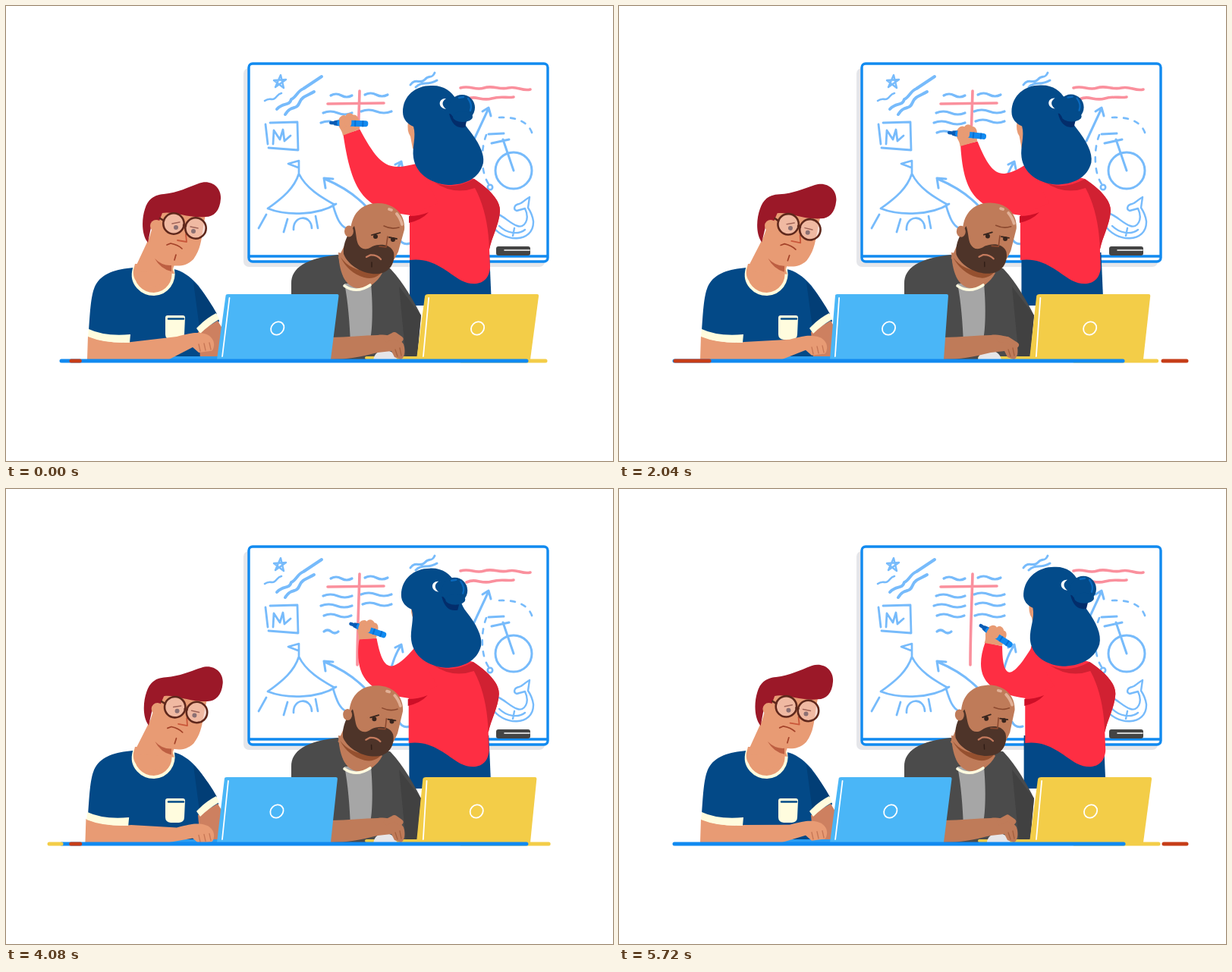
Write an HTML page that moves like this. It is 800 px wide and 600 px high and loops after 5.76 s.

```html
<!DOCTYPE html>
<html lang="en">
<head>
<meta charset="utf-8">
<title>Whiteboard meeting</title>
<style>
html, body { margin: 0; width: 100%; height: 100%; overflow: hidden; background: #fff; }
svg { display: block; width: 100%; height: 100%; }
.line { fill: none; stroke-linecap: round; stroke-linejoin: round; }
.ink { stroke: #77bbfb; stroke-width: 3.2; }
.pink { stroke: #fa909d; stroke-width: 3.6; }
.skin { fill: #e89b74; }
.tan { fill: #bf7b59; }
.ring { stroke: #fff; stroke-width: 1.8; }
</style>
</head>
<body>
<svg viewBox="0 0 800 600">
  <!-- whiteboard -->
  <rect x="313" y="82" width="397" height="262" rx="7" fill="#e5e6ea"/>
  <rect x="320" y="76" width="394" height="261" rx="5" fill="#fff" stroke="#118af0" stroke-width="3.4"/>
  <path d="M320 330H714" stroke="#118af0" stroke-width="3.4"/>
  <rect x="646" y="317" width="45" height="12" rx="3" fill="#444"/>
  <path class="line" d="M657 322H690" stroke="#fff" stroke-width="1.6"/>

  <g class="line ink">
    <path d="M362 91L366 108L353 98L369 97L355 107Z" stroke-width="2.4"/>
    <path d="M341 125C348 120 350 125 354 122S358 116 363 115" stroke-width="2.6"/>
    <path d="M357 136C366 126 373 133 376 123C383 120 384 112 392 109L416 93" stroke-width="4"/>
    <path d="M368 143C377 129 382 139 387 127C390 119 398 118 406 113" stroke-width="4"/>
    <path d="M348 154L384 153L385 190L346 187M342 156L345 182M352 182L353 164L361 176L365 163L367 178L375 171" stroke-width="2.8"/>
    <path d="M345 267C365 253 380 240 386 221C395 240 415 252 433 262M345 267C370 277 412 276 435 261M343 275L333 293M431 263C436 280 440 289 448 293M371 281L366 298M408 277L411 293M379 295C378 276 402 274 403 293M386 220V204L372 208L385 213" stroke-width="2.7"/>
    <path d="M420 228C444 238 464 252 478 268M421 240L419 227L431 228M506 243Q511 221 520 207M513 209L521 205L523 215M518 307Q523 316 532 313" stroke-width="3"/>
    <path d="M533 104C540 94 546 104 552 97S561 97 565 88M540 107C549 98 555 106 568 98" stroke-width="3"/>
    <path d="M616 178L636 135M628 139L636 134L639 145" stroke-width="3"/>
    <path d="M650 147C675 146 690 154 694 170M633 170C625 190 626 222 637 236" stroke-width="2.6" stroke-dasharray="6 9"/>
    <circle cx="638" cy="239" r="3.2" stroke-width="2.6"/>
    <circle cx="669" cy="217" r="24" stroke-width="3"/>
    <path d="M669 217L655 176M640 181L663 176M636 169L656 168" stroke-width="3"/>
    <path d="M640 288C654 313 696 313 695 284C694 276 692 272 688 266L690 252C684 255 681 260 676 261C670 262 668 268 673 270L684 267C691 282 683 293 674 290C664 287 657 277 645 273M650 290C660 300 675 302 684 295M670 293L668 303" stroke-width="2.4"/>
    <g id="notes"></g>
  </g>
  <path class="line pink" d="M599 108C612 104 618 112 630 108S650 111 662 108S680 113 691 110M607 123C620 117 626 126 640 122S660 122 669 120"/>
  <path class="line pink" stroke-width="3" d="M424 129L498 128M466 112C465 150 463 190 463 232"/>

  <!-- presenter -->
  <path id="trousers" fill="#034887" d="M532 325H637L640 395H532Z"/>
  <g id="torso">
    <path fill="#fe2e43" d="M540 207C560 222 600 222 617 228C632 238 652 254 651 271C650 288 640 305 637 321L638 345C636 368 616 370 600 362C580 350 562 331 532 335V272Z"/>
    <path fill="#d12132" d="M564 232Q588 244 617 228C632 238 652 254 651 271C650 288 640 305 637 321C636 290 630 262 618 240Q590 250 564 232Z"/>
  </g>
  <path id="sleeve" fill="#fe2e43"/>
  <path id="armpit" fill="#cd0f27" d="M531 277Q545 277 557 272Q548 282 531 286Z"/>
  <path id="face" class="skin" d="M530 152Q528 165 533 172L536 188L543 190V152Z"/>
  <path id="hair" fill="#034b8a" d="M523 140C523 118 540 105 560 105C576 104 587 112 594 124C600 142 602 154 609 162C622 178 631 194 629 207C624 228 604 236 583 236C558 234 540 220 537 200C535 186 541 172 537 159C530 156 523 150 523 140Z"/>
  <g id="bun">
    <path fill="#032d6b" d="M584 142Q589 163 605 160L608 148Z"/>
    <circle cx="601" cy="134" r="17" fill="#034b8a"/>
    <ellipse cx="602" cy="146" rx="13" ry="7" fill="#034b8a"/>
    <path class="line" d="M609 122Q615 130 612 138M597 121L603 120" stroke="#0a69bd" stroke-width="2.4"/>
    <path fill="#fff" d="M580 122C570 121 568 134 580 136C574 131 574 126 580 122Z"/>
  </g>
  <path id="palm" class="skin" d="M-14 0C-15 -7 -8 -13 -4 -10C-2 -15 4 -14 6 -11C11 -12 14 -6 13 0L14 8L-8 16C-9 8 -14 6 -14 0Z"/>
  <g id="pen">
    <path class="line" d="M1 0H6" stroke="#0a5cb5" stroke-width="4.5"/>
    <path d="M5 -3L11 -4V4L5 3Z" fill="#0a5cb5"/>
    <rect x="9" y="-4" width="41" height="8" rx="3.5" fill="#118af0"/>
    <path d="M33 -4V4M43 -4V4" stroke="#0a6fd0" stroke-width="2"/>
    <rect x="12" y="-8" width="10" height="14" rx="4.5" class="skin"/>
    <rect x="19" y="-8" width="9" height="13" rx="4.5" class="skin"/>
  </g>

  <!-- colleague in the middle -->
  <path fill="#4b4b4b" d="M376 395V366C376 345 395 333 437 328L480 345L506 346C522 362 538 390 547 408L541 466H380Z"/>
  <path fill="#414141" d="M518 370L547 408L542 464H527Z"/>
  <path fill="#a6a6a6" d="M446 366H481C484 400 483 430 479 445H454C453 420 451 390 446 366Z"/>
  <path class="tan" d="M438 325L480 335L496 352C488 366 478 373 463 372C446 370 439 350 438 325Z"/>
  <path class="line" d="M446 369Q462 380 480 368" stroke="#fffbe0" stroke-width="3.6"/>
  <g id="bald">
    <path class="tan" d="M438 332L454 300C454 275 468 260 490 260C513 260 527 276 525 295L517 324C506 348 492 352 478 350L450 345Z"/>
    <path fill="#95502f" d="M441 331C452 348 476 354 498 347C492 357 483 361 472 358C458 354 447 344 441 331Z"/>
    <path fill="#4e3429" d="M459 290C448 303 444 316 445 327C453 347 480 357 496 352C508 348 513 336 511 325C507 314 493 313 483 317C474 323 468 321 464 314C461 307 462 300 459 290Z"/>
    <ellipse class="tan" cx="452" cy="297" rx="6" ry="7.5"/>
    <path class="line" d="M475 331L480 328.500Q489 328 494 334" stroke="#c57b5e" stroke-width="2.3"/>
    <path class="line" d="M482 338V344" stroke="#301d16" stroke-width="1.4"/>
    <path class="line" d="M503 304L501 318L492 317M498 290Q508 295 518 292" stroke="#8b492f" stroke-width="1.6"/>
    <g fill="#38251e"><circle cx="487" cy="304" r="3"/><circle cx="510" cy="308" r="3"/></g>
    <path class="line" d="M482 302L493 299M505 305L515 307" stroke="#38251e" stroke-width="1.8"/>
    <path class="line" d="M505 268L508 269M515 274Q520 280 522 288" stroke="#e1b096" stroke-width="3.8"/>
  </g>
  <path class="line" d="M475 464H546" stroke="#f3cd48" stroke-width="4"/>
  <path id="mouse" fill="#e6e6e9" d="M479 467C480 458 486 454 494 454S509 459 510 467Z"/>
  <path class="tan" d="M428 437C450 437 472 434 490 434C503 432 518 437 524 446C527 455 525 465 520 466L512 463L508 455L490 457C466 463 450 466 428 466Z"/>
  <path class="line" d="M513 453L516 462M519 451L521 461" stroke="#a3603f" stroke-width="1.3"/>
  <path id="finger" class="line" stroke="#bf7b59" stroke-width="8"/>

  <!-- colleague on the left -->
  <path id="shirt" fill="#034987" d="M168 345C145 347 127 352 118 368C112 380 111 400 109 430L163 446V466H262L281 415C272 396 262 378 251 366C243 357 232 349 221 347Z"/>
  <path fill="#023e76" d="M247 364Q265 382 278 406L255 424Z"/>
  <path fill="#cd8060" d="M253 430L279 415L285 425L280 464H256Z"/>
  <path fill="#fffcde" d="M277 405L281 413Q266 422 256 432L251 425Q263 412 277 405Z"/>
  <path fill="#fffcde" d="M210 411Q210 408 213 408H233Q236 408 236 411L235 433Q235 439 228 440H217Q210 439 210 433Z"/>
  <path class="line" d="M214 412.500H234" stroke="#034987" stroke-width="2.4"/>
  <path fill="#e89b74" stroke="#fffcde" stroke-width="4" d="M169 346C163 367 180 380 195 380C213 379 223 363 220 348Z"/>
  <path class="skin" d="M170 340L222 341L218 352C208 378 164 376 168 348Z"/>
  <g id="redhead">
    <path class="skin" d="M201 265L263 276C257 300 260 316 247 334C237 344 227 343 218 342L222 353L168 350L189 305Z"/>
    <path fill="#bd5f42" d="M196 333Q206 343 218 342L218 350Q204 347 196 333Z"/>
    <path fill="#9b1828" d="M187 312C178 301 179 280 183 268C187 254 196 249 208 248C227 246 240 239 254 234C270 228 284 239 283 254C282 270 274 278 263 278C240 280 220 270 206 273L201 286L192 287Z"/>
    <circle class="skin" cx="198" cy="290" r="8"/>
    <path class="line" d="M237 301L238 311L226 309" stroke="#c9573a" stroke-width="1.8"/>
    <path class="line" d="M212 315L217 313Q227 315 232 320M222 335L224 328" stroke="#a34229" stroke-width="1.7"/>
    <g fill="#f4cabb" fill-opacity=".65" stroke="#5f281c" stroke-width="2.6"><circle cx="221" cy="287" r="13.700"/><circle cx="250" cy="293" r="13.700"/></g>
    <path class="line" d="M234 289L237 290M208 283L203 280" stroke="#5f281c" stroke-width="2.6"/>
    <g id="eyes" fill="#8c7073"><circle cx="224" cy="292" r="3"/><circle cx="247" cy="297" r="3"/></g>
    <path class="line" d="M219 287L229 285M243 291L253 293" stroke="#a26559" stroke-width="1.5"/>
  </g>
  <path class="line" d="M210 464H282" stroke="#2b9df0" stroke-width="4"/>
  <path id="forearm" class="skin"/>
  <path id="knuckles" class="line" stroke="#c67655" stroke-width="1.3"/>
  <path id="cuff" fill="#fffcde" d="M109 426Q130 436 164 433L163 444Q130 445 108 436Z"/>

  <!-- laptops -->
  <g id="blueLaptop">
    <path fill="#4ab6f7" d="M291 380H435Q437 380 437 382L428 466H278L288 382Q288 380 291 380Z"/>
    <path class="line ring" d="M293 385L285 462"/>
    <ellipse class="line ring" rx="9.200" ry="8" transform="translate(357 425) rotate(-45)"/>
  </g>
  <g id="yellowLaptop">
    <path fill="#f3cd48" d="M557 380H701Q703 380 703 382L691 466H541L553 382Q554 380 557 380Z"/>
    <path class="line ring" d="M558 385L550 462"/>
    <ellipse class="line ring" rx="9.200" ry="8" transform="translate(622 425) rotate(-45)"/>
  </g>
  <g id="table" class="line" stroke-width="5"></g>
</svg>
<script>
const LOOP = 5760, STEP = 40;
const $ = id => document.getElementById(id);
const set = (id, name, value) => $(id).setAttribute(name, value);
const move = (id, value) => set(id, 'transform', value);
const clamp01 = x => Math.max(0, Math.min(1, x));
const mix = (a, b, p) => a + (b - a) * p;
const smooth = p => p * p * (3 - 2 * p);
const progress = (t, from, to) => clamp01((t - from) / (to - from));
const wave = (t, period, peak = 0) => Math.cos(2 * Math.PI * (t - peak) / period);
const bump = (t, peak, width) => Math.exp(-(((t - peak) / width) ** 2));
const polar = (length, degrees) => {
  const a = degrees * Math.PI / 180;
  return [length * Math.cos(a), length * Math.sin(a)];
};
const skewAt = (y, k) => `matrix(1 0 ${-k} 1 ${k * y} 0)`;

// Key poses for the two heads and the presenter, eased from beat to beat.
const BEATS = [0, 1520, 2520, 3480, 4080, 5040, 5720];
const LEAN = [0, -7.5, -6, 2.5, -3, -10, 3.5];
const TURN = [0, 0.5, 2, 5.5, 1, 3, 7.5];
const NOD = [0, 3, 1.3, 3, 1.7, 3.2, -0.6];
const TILT = [0, 0.6, -3, -3.5, -2, -1, -3.5];

function pose(values, t) {
  let i = 0;
  while (i < BEATS.length - 2 && t >= BEATS[i + 1]) i++;
  return mix(values[i], values[i + 1], smooth(progress(t, BEATS[i], BEATS[i + 1])));
}

// Lines on the board: x1, x2, y, then when they are written.
const NOTES = [
  [415, 456, 154, -180, 420],
  [470, 508, 152, 720, 1150],
  [419, 455, 167, 1520, 2750],
  [419, 438, 188, 3300, 3760],
  [469, 508, 167, 4400, 5300],
  [470, 508, 182, 5860, 6400]
];
const scribble = ([x1, x2, y]) => {
  const half = (x2 - x1) / 2;
  return `<path pathLength="1" d="M${x1} ${y}q${half / 2} -4 ${half} 0t${half} 0"/>`;
};
const HEADINGS = [[428, 456, 118], [473, 503, 117], [418, 456, 141], [468, 508, 139]];
$('notes').innerHTML = [...NOTES, ...HEADINGS].map(scribble).join('');

function drawNotes(t) {
  NOTES.forEach(([, , , from, to], i) => {
    const path = $('notes').children[i], done = progress(t, from, to);
    path.style.visibility = done > 0 ? 'visible' : 'hidden';
    path.setAttribute('stroke-dasharray', `${done} 2`);
  });
}

// The pen writes each line, then glides to the start of the next.
function penTip(t) {
  const i = NOTES.findIndex((note, k) => t < NOTES[k + 1][3]);
  const [x1, x2, y, from, to] = NOTES[i], [nextX, , nextY, nextFrom] = NOTES[i + 1];
  const glide = smooth(progress(t, to, nextFrom));
  return [mix(mix(x1, x2, progress(t, from, to)), nextX, glide), mix(y, nextY, glide)];
}

// Pen, hand and elbow angles all follow from where the tip is.
function drawArm(t, dx) {
  const [tx, ty] = penTip(t), reach = tx - 428, drop = ty - 155;
  const pen = reach * 0.65 + 2, turn = pen * 0.95 - 19;
  const [px, py] = polar(24.5, pen), [ux, uy] = polar(1, turn);
  const hx = tx + px, hy = ty + py;
  const wrist = [hx - 12 * uy, hy + 12 * ux];
  const left = [wrist[0] - 11.5 * ux, wrist[1] - 11.5 * uy];
  const right = [wrist[0] + 11.5 * ux, wrist[1] + 11.5 * uy];
  const bend = reach * 0.17 + dx, ix = 498 + bend, iy = 211 + drop * 0.8 + reach * 0.35, ox = 466 + bend;
  set('sleeve', 'd', `M${left}C${ox - 10} 245 ${ox + 5} 269 ${533 + dx} 276` +
    `L${570 + dx} 260L${541 + dx} 208C${ix + 7} ${iy + 7} ${ix - 4} ${iy + 4} ${right}Z`);
  move('palm', `translate(${hx} ${hy}) rotate(${turn + 17})`);
  move('pen', `translate(${tx} ${ty}) rotate(${pen})`);
}

function drawPresenter(t) {
  const lean = pose(LEAN, t), turn = pose(TURN, t), away = bump(t, 3750, 500);
  const body = lean * 0.5 + turn * 0.2, top = lean + turn, rise = -turn * 0.3;
  move('trousers', `translate(${body / 2} 0)`);
  move('torso', `translate(${body} 0)`);
  move('armpit', `translate(${body} 0)`);
  move('hair', `translate(${lean} ${rise}) ${skewAt(215, turn / 85)}`);
  move('bun', `translate(${top - 12 * away} ${rise})`);
  move('face', `translate(${top + 10 * away} ${rise})`);
  drawArm(t, body);
}

function drawMiddle(t) {
  const slide = wave(t, 1440, 4200), lift = clamp01(slide);
  move('bald', `rotate(${pose(TILT, t)} 465 350)`);
  move('mouse', `translate(${slide * 6} 0)`);
  set('finger', 'd', `M502 439L512 ${mix(440, 433, lift)}L${mix(523, 519, lift)} ${mix(447, 438, lift)}`);
}

function drawLeft(t) {
  const blink = Math.abs(t - 2520) < 100 ? 0.15 : 1;
  move('redhead', `rotate(${pose(NOD, t)} 200 345)`);
  move('eyes', `translate(0 ${294 * (1 - blink)}) scale(1 ${blink})`);
  const w = 438 - 6 * wave(t, 2520), e = -4 * bump(t, 3750, 500);
  move('shirt', `translate(${e / 3} 0)`);
  move('cuff', `translate(${e * 0.7} 0)`);
  set('forearm', 'd', `M${108 + e} 435C125 443 150 445 165 443L225 ${w + 4}C244 ${w - 1} 250 ${w - 2} 261 ${w}` +
    `C270 ${w + 2} 275 ${w + 9} 274 ${w + 16}Q273 ${w + 24} 269 ${w + 23}L254 ${w + 25}L246 ${w + 18}L215 466H${107 + e}Z`);
  set('knuckles', 'd', [254, 261, 268].map((x, i) => `M${x} ${w + 14 - i}l2 9`).join(''));
}

// Dashes on the table edge grow out of a point and shrink back: x, x1, x2, from, to.
const RED = '#c63d18', YELLOW = '#f3cd48', BLUE = '#118af0';
const DASHES = [
  [YELLOW, 57, 57, 71, 850, 1700],
  [YELLOW, 57, 57, 73, 3750, 5110],
  [RED, 90, 74, 119, -75, 4160],
  [RED, 748, 717, 748, 100, 550],
  [RED, 748, 717, 748, 1560, 3300],
  [RED, 748, 718, 748, 5350, 6200]
];

function drawTable(t) {
  const bar = (color, x1, x2) => `<path stroke="${color}" d="M${x1} 468H${x2}"/>`;
  const blueLeft = 73 + 79 * bump(t, 3480, 250) + 24 * bump(t, 5040, 250);
  const yellowRight = 711 + 6 * bump(t, 3780, 500) - 10 * bump(t, 2520, 400);
  let bars = bar(YELLOW, 600, yellowRight) + bar(BLUE, blueLeft, 675 + 11 * wave(t, 4000));
  for (const [color, x, x1, x2, from, to] of DASHES) {
    const size = Math.min(progress(t, from, from + 300), progress(t, to, to - 300));
    if (size > 0) bars += bar(color, mix(x, x1, size), mix(x, x2, size));
  }
  $('table').innerHTML = bars;
}

function draw(t) {
  drawNotes(t);
  drawPresenter(t);
  drawMiddle(t);
  drawLeft(t);
  move('blueLaptop', skewAt(466, (2.6 * wave(t, LOOP, 5300) - 0.7) / 86));
  move('yellowLaptop', skewAt(466, (1.5 * wave(t, LOOP / 2) - 2.4) / 86));
  drawTable(t);
}

const start = performance.now();
function tick(now) {
  const t = Math.max(0, now - start) % LOOP;
  draw(Math.floor(t / STEP) * STEP);
  requestAnimationFrame(tick);
}
draw(0);
requestAnimationFrame(tick);
</script>
</body>
</html>
```
